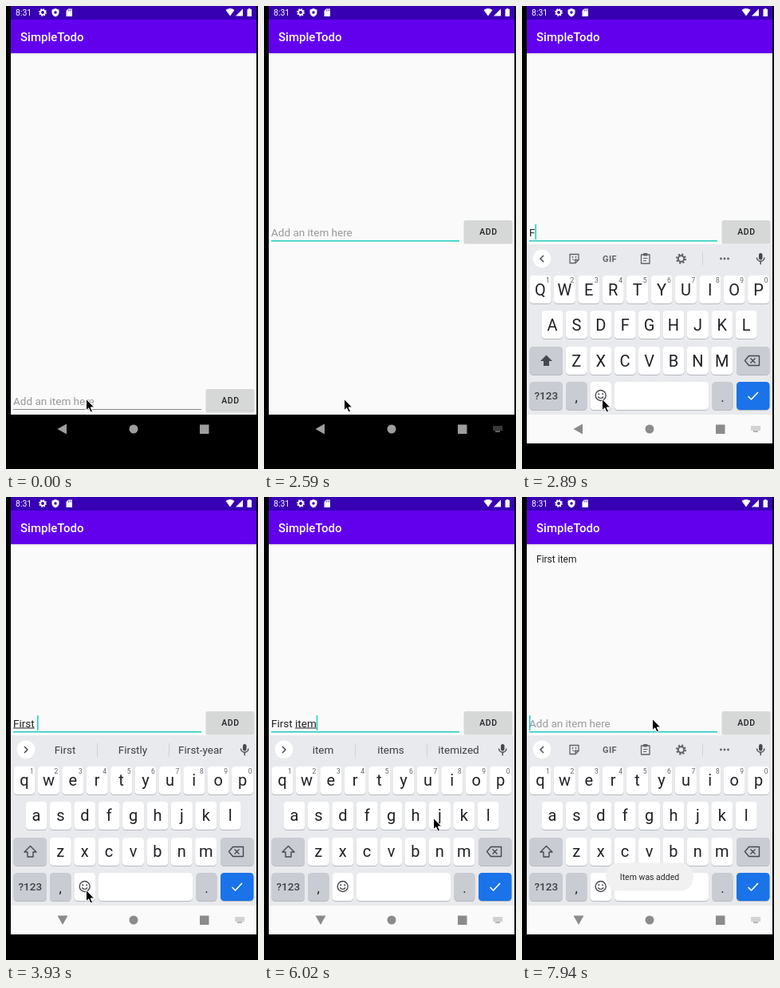
An HTML page that plays this animation: 316x579 px, repeating every 8000 ms.

```html
<!DOCTYPE html>
<html lang="en">
<head>
<meta charset="utf-8">
<title>Todo list demo</title>
<style>
  html, body { margin: 0; width: 100%; height: 100%; overflow: hidden; background: #000; }
  svg { display: block; }
  text { font-family: Roboto, Arial, sans-serif; white-space: pre; }
</style>
</head>
<body>
<svg id="stage" width="316" height="579" viewBox="0 0 316 579"></svg>
<script>
const LOOP = 8000;
const INK = '#202124', GREY = '#5f6368', TEAL = '#1fcdbb';
const stage = document.getElementById('stage');
const pen = document.createElement('canvas').getContext('2d');

// Each step changes part of the state from its time on.
const steps = [
  [0, { mouse: [100, 491], text: '', list: '', words: null, under: 0, toast: 0 }],
  [1400, { focus: true, caret: true }],
  [1990, { caret: false }],
  [2140, { imeIcon: true }],
  [2590, { raised: true }],
  [2740, { keys: true, upper: true, caret: true }],
  [2890, { text: 'F' }],
  [3040, { upper: false, words: ['F', 'For', 'From'], under: 1 }],
  [3190, { text: 'Fi', words: ['Fi', 'First', 'Find'] }],
  [3330, { text: 'Fir', words: ['Fir', 'First', 'Fire'] }],
  [3480, { text: 'Firs', words: ['Firs', 'First', 'Firsts'] }],
  [3630, { text: 'First' }],
  [3780, { words: ['First', 'Firstly', 'First-year'] }],
  [3930, { text: 'First ' }],
  [4230, { under: 0 }],
  [4380, { words: ['of', 'time', 'and'] }],
  [4680, { text: 'First i' }],
  [4980, { under: 2, words: ['I', 'in', 'is'] }],
  [5280, { text: 'First it', words: ['it', 'it\'s', 'is'] }],
  [5430, { text: 'First ite', words: ['ite', 'item', 'it'] }],
  [5730, { text: 'First item', words: ['item', 'items', 'itemized'] }],
  [5880, { mouse: [152, 460] }],
  [6020, { mouse: [212, 401] }],
  [6170, { mouse: [250, 343] }],
  [6320, { mouse: [272, 303] }],
  [6470, { mouse: [282, 285] }],
  [6610, { mouse: [285, 280] }],
  [6910, { pressed: true }],
  [7060, { pressed: false, text: '', under: 0, list: 'First item' }],
  [7210, { mouse: [258, 282] }],
  [7350, { mouse: [214, 281], caret: false, toast: 0.12 }],
  [7500, { mouse: [190, 279], toast: 0.6 }],
  [7650, { mouse: [172, 278], toast: 1, words: null }],
  [7790, { mouse: [163, 277], caret: true }],
];

const rect = (x, y, w, h, fill, r = 0, more = '') =>
  `<rect x="${x}" y="${y}" width="${w}" height="${h}" rx="${r}" fill="${fill}" ${more}/>`;
const disc = (x, y, r, fill) => `<circle cx="${x}" cy="${y}" r="${r}" fill="${fill}"/>`;
const shape = (d, fill) => `<path d="${d}" fill="${fill}"/>`;
const line = (d, color, w = 1.3) =>
  `<path d="${d}" fill="none" stroke="${color}" stroke-width="${w}" stroke-linejoin="round"/>`;
const label = (s, x, y, size, fill, anchor = 'start', weight = 400, more = '') =>
  `<text x="${x}" y="${y}" font-size="${size}" fill="${fill}" text-anchor="${anchor}" font-weight="${weight}" ${more}>${s}</text>`;
const ring = (x, y, r, color, w, more = '') =>
  `<circle cx="${x}" cy="${y}" r="${r}" fill="none" stroke="${color}" stroke-width="${w}" ${more}/>`;

function gear(x, y, r, color, w) {
  const tooth = Math.PI * 2 * r / 16;
  return ring(x, y, r, color, r * 0.45, `stroke-dasharray="${tooth}"`) + ring(x, y, r * 0.7, color, w);
}

function width(s) {
  pen.font = '13.5px Roboto, Arial, sans-serif';
  return pen.measureText(s).width;
}

function statusBar() {
  return rect(6, 0, 308, 17, '#3700b3') + label('8:31', 12, 12, 10.5, '#fff')
    + gear(46, 8, 4, '#fff', 1.8)
    + shape('M62 3l4.5 1.7v3.3q0 3.7-4.5 5.5q-4.5-1.8-4.5-5.5v-3.3z', '#fff') + disc(62, 8, 1.7, '#3700b3')
    + shape('M78 3.500h5v9.500h-7.500v-7z', '#fff') + line('M78.500 4.500v2M80.300 4.500v2M82 4.500v2', '#3700b3', 0.7)
    + shape('M275.500 5q5.500-4 11 0l-5.500 7.500z', '#fff')
    + shape('M297 3.500v9h-9z', '#fff')
    + shape('M304 3h2.500v1h1.500v9h-5.500v-9h1.500z', '#fff');
}

function appBar() {
  return rect(6, 17, 308, 42, '#6200ee') + label('SimpleTodo', 18, 44, 15, '#fff', 'start', 500)
    + rect(6, 59, 308, 1, '#000', 0, 'opacity=".1"') + rect(6, 60, 308, 1.500, '#000', 0, 'opacity=".04"');
}

function navBar(s) {
  const color = s.keys ? '#8b8b8b' : '#9e9e9e';
  let out = rect(6, 511, 308, 36, s.keys ? '#fafafa' : '#000');
  out += shape(s.keys && !s.upper ? 'M64.500 523.500h13l-6.500 11.500z' : 'M76 522.500v13l-11.500-6.500z', color);
  out += disc(160, 529, 5.500, color) + rect(243, 523.500, 11.500, 11.500, color, 0.5);
  if (s.imeIcon) {
    for (let i = 0; i < 6; i++)
      for (let j = 0; j < 3; j++) out += rect(287.500 + i * 2, 525.500 + j * 2, 1.200, 1.200, color);
    out += rect(290, 531.500, 6, 1.200, color);
  }
  return out;
}

function inputRow(s) {
  const y = s.raised ? 268 : 479, base = y + 19.500;
  let out = s.text ? label(s.text, 9, base, 13.5, INK) : label('Add an item here', 9, base, 13.5, '#999');
  out += s.focus ? rect(9, y + 25, 236, 1.500, TEAL) : rect(9, y + 25, 236, 1, '#8a8a8a');
  if (s.under) {
    const from = s.under === 2 ? width('First ') : 0;
    out += rect(9 + from, base + 1, width(s.text.trim()) - from, 1, INK);
  }
  if (s.caret) out += rect(9 + width(s.text), y + 5, 1.500, 19, TEAL);
  return out + rect(250.500, y + 1, 61, 28.500, '#000', 2, 'opacity=".14"')
    + rect(251, y, 60, 28, s.pressed ? '#c0c1c1' : '#d6d7d7', 1.500)
    + label('ADD', 281.4, y + 18, 10.5, INK, 'middle', 500, 'letter-spacing=".5"');
}

function key(x, y, w, fill = '#fff', h = 35) {
  return rect(x, y + 1, w, h, '#b6b9be', 4.500) + rect(x, y, w, h, fill, 4.500);
}

function topStrip(s) {
  const mic = rect(297, 309, 4.500, 8.500, '#45484d', 2.200)
    + line('M294.500 314.500a4.700 4.700 0 0 0 9.400 0M299.200 319.200v4', '#45484d', 1.400);
  let out = disc(25, 316.500, 11.500, '#d5d7db') + disc(25, 316, 11.500, '#fff') + mic
    + line(s.words ? 'M23 312l4 4l-4 4' : 'M27 312l-4 4l4 4', '#45484d', 1.500);
  if (s.words) {
    s.words.forEach((w, i) => out += label(w, 74 + i * 85, 321, 13.5, '#3c4043', 'middle'));
    return out + rect(114, 308, 1, 17, '#cfd2d6') + rect(204, 308, 1, 17, '#cfd2d6');
  }
  out += line('M60 310.500h11v7l-4 4h-7zM71 317.500h-4v4', GREY)
    + disc(63.500, 314, 0.9, GREY) + disc(67.500, 314, 0.9, GREY) + line('M63 316.500q2.500 2.500 5 0', GREY, 1);
  out += label('GIF', 110, 320, 11, GREY, 'middle', 700, 'letter-spacing=".4"');
  out += line('M149.500 311h10.500v11h-10.500z', GREY) + rect(152, 309, 5.500, 3.500, GREY, 1)
    + line('M152 315.500h5.500M152 318.500h4', GREY, 1.100);
  out += gear(199.500, 316, 5.300, GREY, 2) + rect(226, 308, 1, 16, '#cfd2d6');
  for (const x of [249.500, 254, 258.500]) out += disc(x, 316, 1.400, GREY);
  return out;
}

function keyboard(s) {
  const dark = '#c9ccd2', drop = s.upper ? 25.300 : 24.300;
  let out = rect(6, 298, 308, 214, '#e8eaed') + topStrip(s);
  [['qwertyuiop', 23, 337], ['asdfghjkl', 38, 381], ['zxcvbnm', 68.3, 426]].forEach(([row, x0, y], r) => {
    [...row].forEach((c, i) => {
      const x = x0 + i * 30.4;
      out += key(x - 13.5, y, 27) + label(s.upper ? c.toUpperCase() : c, x, y + drop, 20, INK, 'middle');
      if (!r) out += label((i + 1) % 10, x + 9.5, y + 9, 8.5, GREY, 'middle');
    });
  });
  const arrow = 'M30.500 436.500l7.500 7.500h-4v6h-7v-6h-4z';
  out += key(9.500, 426, 41.500, dark) + (s.upper ? shape(arrow, '#45484d') : line(arrow, '#45484d', 1.400));
  out += key(269, 426, 41.500, dark)
    + line('M284.500 437.500h13v12h-13l-5-6zM286.500 440.500l6 6M292.500 440.500l-6 6', '#45484d', 1.400);
  out += key(9.500, 470, 41.500, dark) + label('?123', 30.3, 492, 13.5, '#3c4043', 'middle', 500);
  out += key(55, 470, 26.500, dark) + label(',', 68.3, 495, 17, INK, 'middle');
  out += key(85.500, 470, 26.500) + ring(98.7, 487, 6.500, '#45484d', 1.400)
    + disc(96.300, 485.300, 1, '#45484d') + disc(101.200, 485.300, 1, '#45484d')
    + line('M95.200 488.500q3.500 4 7 0', '#45484d', 1.200);
  out += key(116, 470, 118) + key(238.500, 470, 26, dark) + label('.', 251.5, 495, 17, INK, 'middle');
  return out + key(269, 470, 41.500, '#1a73e8') + line('M283.500 488l4 4l8.500-9', '#fff', 1.700);
}

function toast(alpha) {
  return `<g opacity="${alpha}">` + rect(105, 457.500, 110, 35, '#f1f1f1', 17)
    + label('Item was added', 160, 479, 10.5, '#2a2a2a', 'middle') + '</g>';
}

function pointer([x, y]) {
  return `<path transform="translate(${x} ${y})" d="M.5 .5v14.200l3.200-2.900l2.300 5.200l2.500-1.100l-2.300-5h4.500z"
    fill="#000" stroke="#fff" stroke-width="1"/>`;
}

function scene(s) {
  return rect(0, 0, 316, 579, '#000') + rect(6, 59, 308, 452, '#fafafa')
    + statusBar() + appBar()
    + label(s.list, 18, 81.5, 12, INK)
    + inputRow(s) + (s.keys ? keyboard(s) : '') + navBar(s)
    + (s.toast ? toast(s.toast) : '') + pointer(s.mouse);
}

let shown = -1;
function draw() {
  const t = performance.now() % LOOP;
  const past = steps.filter(([at]) => at <= t);
  if (past.length !== shown) {
    shown = past.length;
    stage.innerHTML = scene(Object.assign({}, ...past.map(p => p[1])));
  }
  requestAnimationFrame(draw);
}
draw();
</script>
</body>
</html>
```
